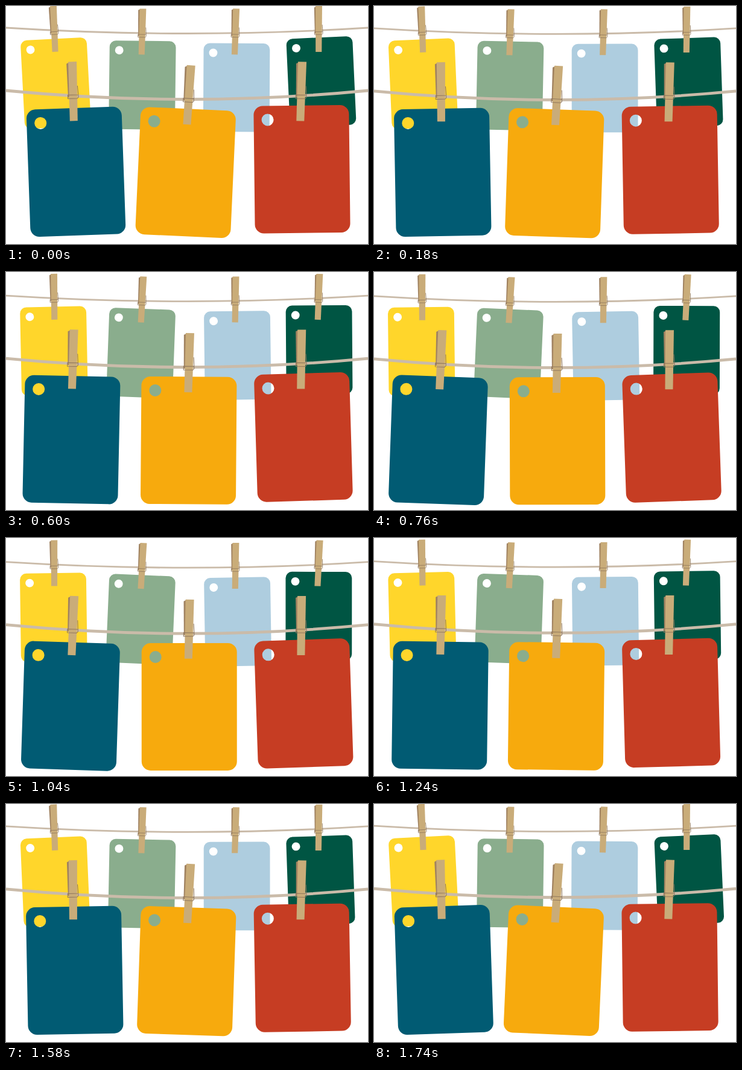
An HTML page that plays this animation: 600 px wide and 394 px high, repeating every 1760 ms.

```html
<!DOCTYPE html>
<html lang="en">
<head>
<meta charset="utf-8">
<title>Cards on a washing line</title>
<style>
html, body { margin: 0; width: 100%; height: 100%; overflow: hidden; background: #fff; }
svg { display: block; width: 600px; height: 394px; }
</style>
</head>
<body>
<svg viewBox="0 0 600 394">
  <defs>
    <path id="card" fill-rule="evenodd" d="M-64 0H64a15 15 0 0 1 15 15V196a15 15 0 0 1-15 15H-64a15 15 0 0 1-15-15V15a15 15 0 0 1 15-15ZM-66 23a10 10 0 0 0 20 0a10 10 0 0 0-20 0Z"/>
    <g id="peg">
      <path fill="#a08260" d="M-9 -43L-5 -45V13H-8Z"/>
      <path fill="#c9ac79" d="M-6 -46H8L6.500 52H-6.500Z"/>
      <path fill="none" stroke="#8f765c" d="M8 -6L9 9H-8.500V15H7L9 13V9"/>
    </g>
  </defs>
  <g id="scene"></g>
</svg>
<script>
const LOOP = 1760, WIDTH = 600, DROP = 4.5;
const scene = document.getElementById('scene');

// x, y: middle of the top edge; pegX: peg position; from, to: swing in degrees
const card = (color, x, y, pegX, from, to) => ({ color, x, y, pegX, from, to });
const rows = [
  { end: 36, sag: 9.5, thick: 2.8, lift: 4.8, size: 0.695, pegSize: 0.775, cards: [
    card('#ffd62b', 77.6, 54.4, 79.5, -3, -0.3),
    card('#8aad8d', 227, 57.7, 225.5, 0.7, 2.8),
    card('#aecddf', 382.6, 61.7, 380, 0.3, -1.2),
    card('#005543', 518.4, 52.2, 518, -2.6, 0.6)
  ] },
  { end: 140, sag: 14.5, thick: 4.8, lift: 10.4, size: 1, pegSize: 1, cards: [
    card('#015b73', 111.3, 169, 110.6, -2, 2.7),
    card('#f7aa0d', 303.7, 170.3, 303, 2.6, -0.6),
    card('#c63d23', 489, 164.8, 489, -0.65, -2.2)
  ] }
];

const ropeY = ({ end, sag }, x) => end + 4 * sag * x / WIDTH * (1 - x / WIDTH);
const lean = x => 3 * (x / WIDTH) ** 2;

function add(tag, attrs, parent = scene) {
  const node = document.createElementNS('http://www.w3.org/2000/svg', tag);
  for (const name in attrs) node.setAttribute(name, attrs[name]);
  return parent.appendChild(node);
}

const swings = rows.flatMap(row => {
  const { end, sag, thick, lift, size, pegSize, cards } = row;
  add('path', {
    d: `M0 ${end}Q${WIDTH / 2} ${end + 2 * sag} ${WIDTH} ${end}`,
    fill: 'none', stroke: '#cabba9', 'stroke-width': thick
  });
  return cards.map(({ color, x, y, pegX, from, to }) => {
    const pegY = ropeY(row, pegX) - lift;
    const group = add('g');
    add('use', { href: '#card', fill: color, transform: `translate(${x} ${y}) scale(${size})` }, group);
    add('use', {
      href: '#peg',
      transform: `translate(${pegX} ${pegY}) rotate(${lean(pegX)}) scale(${pegSize})`
    }, group);
    return u => group.setAttribute('transform', `rotate(${from + (to - from) * u} ${pegX} ${pegY})`);
  });
});

function draw(now) {
  const u = 1 - Math.abs(1 - 2 * (now % LOOP) / LOOP);
  scene.setAttribute('transform', `translate(0 ${DROP * u})`);
  swings.forEach(swing => swing(u));
}

let start;
function tick(now) {
  start ??= now;
  draw(now - start);
  requestAnimationFrame(tick);
}
draw(0);
requestAnimationFrame(tick);
</script>
</body>
</html>
```
